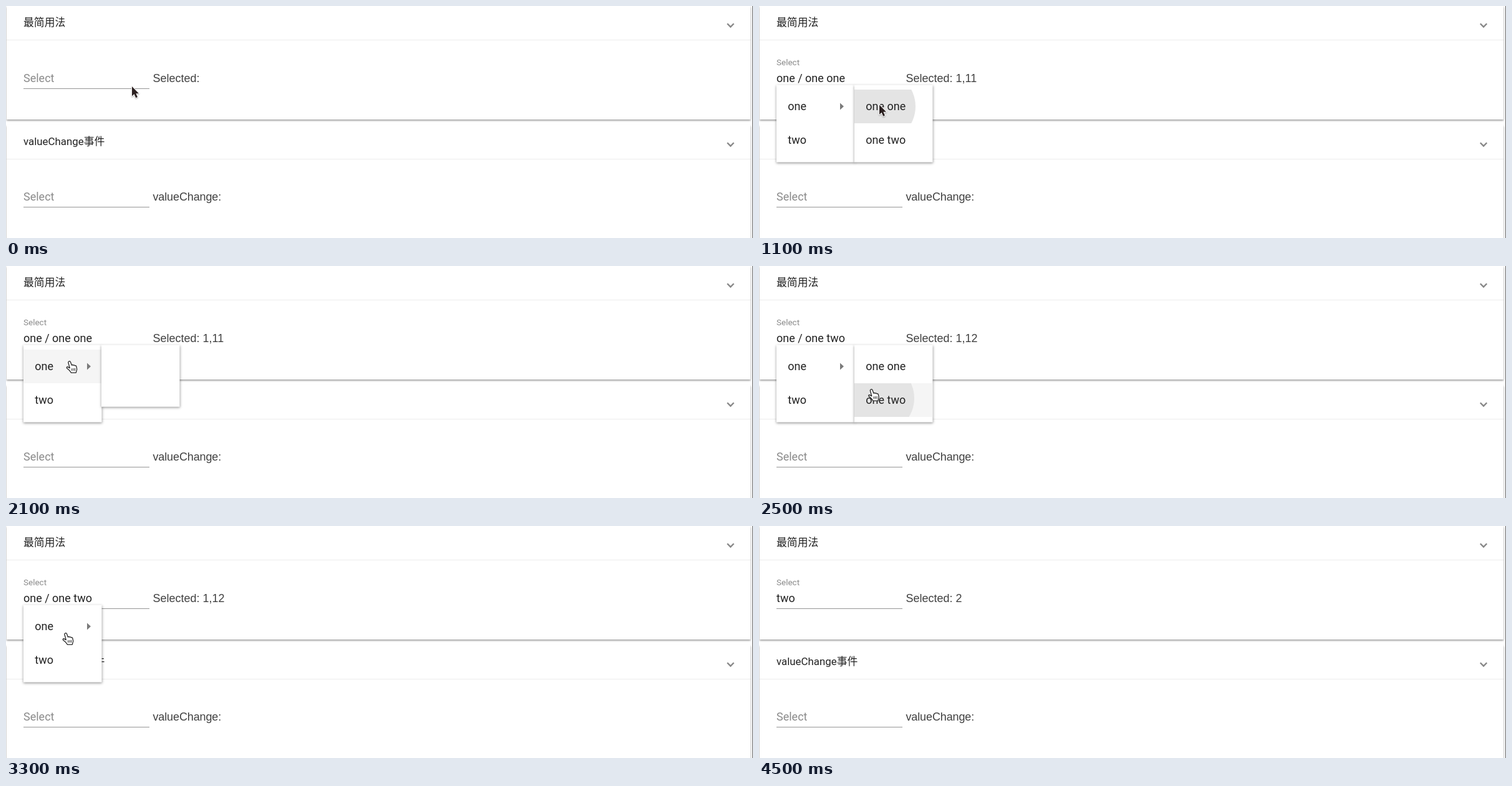
These frames come from a looping animation (1198 by 372 pixels, 4.6 s). An HTML page with a canvas:

```html
<!DOCTYPE html>
<html lang="zh">
<head>
<meta charset="utf-8">
<title>Cascading select</title>
<style>
  html, body { margin: 0; width: 100%; height: 100%; overflow: hidden; background: #fff; }
  canvas { display: block; width: 1198px; height: 372px; }
</style>
</head>
<body>
<canvas id="stage" width="1198" height="372"></canvas>
<script>
const ctx = document.getElementById('stage').getContext('2d');
const LOOP = 4600, STEP = 100;
const UI = 'Roboto, "Noto Sans CJK SC", "Noto Sans CJK", sans-serif';
const BODY = '"Liberation Sans", Arial, sans-serif';

const rootOpen = [[300, 1300], [1700, 2600], [2900, 3600]];
const subOpen = [[700, 1300], [2000, 2600]];
const picks = [
  { at: 1100, value: 'one / one one', result: '1,11' },
  { at: 2500, value: 'one / one two', result: '1,12' },
  { at: 3600, value: 'two', result: '2' }
];
// click time, menu x, row, pointer x, pointer y
const ripples = [[1000, 153, 0, 194, 161], [2400, 153, 1, 192, 212], [3500, 28, 1, 88, 212]];
const hovers = [[500, 800, 28, 0], [1900, 2300, 28, 0], [2300, 2600, 153, 1], [3400, 3600, 28, 1]];
// time, x, y, pointer shape from that time on
const path = [
  [0, 202, 129, 'arrow'], [300, 198, 127, 'arrow'], [600, 128, 157, 'hand'],
  [800, 165, 159, 'hand'], [1000, 194, 159, 'arrow'], [1400, 190, 157, 'arrow'],
  [1700, 150, 122, 'hand'], [1900, 108, 150, 'hand'], [2100, 101, 152, 'hand'],
  [2200, 115, 156, 'hand'], [2400, 189, 206, 'hand'], [2600, 170, 188, 'arrow'],
  [2800, 131, 140, 'arrow'], [2900, 118, 122, 'hand'], [3100, 104, 140, 'hand'],
  [3300, 95, 171, 'hand'], [3500, 87, 206, 'hand'], [3900, 85, 207, 'hand'],
  [4000, 84, 212, 'hand'], [4200, 78, 290, 'arrow'], [4400, 70, 380, 'arrow']
];

const clamp = v => Math.max(0, Math.min(1, v));
const lerp = (a, b, k) => a + (b - a) * k;
const within = (t, from, to) => t >= from && t < to;

function rect(x, y, w, h, color) {
  ctx.fillStyle = color;
  ctx.fillRect(x, y, w, h);
}

function text(str, x, y, size, color, family = UI, spacing = '0px') {
  ctx.font = `${size}px ${family}`;
  ctx.letterSpacing = spacing;
  ctx.fillStyle = color;
  ctx.fillText(str, x, y);
}

function panel(x, y, w, h, blur, drop, alpha) {
  ctx.save();
  ctx.shadowColor = `rgba(0,0,0,${alpha})`;
  ctx.shadowBlur = blur;
  ctx.shadowOffsetY = drop;
  rect(x, y, w, h, '#fff');
  ctx.restore();
}

function chevron(y) {
  ctx.strokeStyle = '#858585';
  ctx.lineWidth = 2.3;
  ctx.beginPath();
  ctx.moveTo(1156.8, y - 2.8);
  ctx.lineTo(1162, y + 2.5);
  ctx.lineTo(1167.2, y - 2.8);
  ctx.stroke();
}

function card(y, h, title, hovered) {
  panel(1, y, 1193, h, 3, 1.5, .45);
  if (hovered) rect(1, y, 1193, 55, '#f6f6f6');
  rect(1, y + 55, 1193, 1, '#ececec');
  text(title, 28, y + 33, 16.88, '#222');
  chevron(y + 32);
}

function field(y, label, value, float, caption, spacing) {
  const size = lerp(18, 13.5, float);
  text(label, 28, y + lerp(0, -27.5, float), size, '#8b8b8b');
  text(value, 28, y, 18, '#222');
  rect(28, y + 10, 202, 1, '#969696');
  text(caption, 235.5, y, 18, '#404040', BODY, spacing);
}

function menu(t, spans, x, items, nested) {
  const span = spans.find(([from, to]) => within(t, from, to + 200));
  if (!span) return;
  const age = t - span[0];
  const scale = Math.min(1, .6 + age / 500);
  const height = 124 * scale;
  const alpha = 1 - clamp((t - span[1]) / 200);
  if (!alpha) return;
  ctx.save();
  ctx.globalAlpha = alpha;
  panel(x, 126.5, 125.5, height, 4, 1.5, .42);
  ctx.beginPath();
  ctx.rect(x, 126.5, 125.5, height);
  ctx.clip();
  for (const [from, to, hx, row] of hovers)
    if (hx === x && within(t, from, to)) rect(x, 134 + row * 54, 125.5, 54, '#f5f5f5');
  for (const ripple of ripples) if (ripple[1] === x) drawRipple(t, ripple, alpha);
  ctx.globalAlpha = alpha * clamp((age - 100) / 200);
  items.forEach((item, i) => text(item, x + 18.3, 167.3 + i * 54, 18, '#222'));
  if (nested) {
    ctx.fillStyle = '#7b7b7b';
    ctx.beginPath();
    ctx.moveTo(x + 102, 155.5);
    ctx.lineTo(x + 108, 161);
    ctx.lineTo(x + 102, 166.5);
    ctx.fill();
  }
  ctx.restore();
}

function drawRipple(t, [at, x, row, cx, cy], alpha) {
  const age = t - at;
  if (!within(age, 0, 400)) return;
  ctx.save();
  ctx.globalAlpha = alpha * (1 - clamp((age - 100) / 300));
  ctx.beginPath();
  ctx.rect(x, 134 + row * 54, 125.5, 54);
  ctx.clip();
  ctx.beginPath();
  ctx.arc(cx, cy, 57 * age / 100, 0, Math.PI * 2);
  ctx.fillStyle = '#e4e4e4';
  ctx.fill();
  ctx.restore();
}

const arrow = new Path2D('M0 0V15.5L3.6 12.2L6.2 18.2L9 17L6.4 11.2H11Z');
const hand = new Path2D('M4 1.2Q5.8-.2 7 2L8.8 7Q10.2 5.8 11.4 7.2Q12.8 6.2 14 7.8Q15.8 7.2 16.4 9.2L17.2 13.6L15.8 19.2H8L5.4 15.6L1 11.8Q.2 9.8 2.2 9.6L5.8 11.6L3.4 3Q3.2 1.8 4 1.2Z');
const fingers = new Path2D('M9.2 12.2V16M11.6 12V16M14 11.8V16');

function pointer(t) {
  let i = path.length - 1;
  while (path[i][0] > t) i--;
  const a = path[i], b = path[i + 1];
  if (!b) return;
  const k = (t - a[0]) / (b[0] - a[0]);
  const x = lerp(a[1], b[1], k), y = lerp(a[2], b[2], k);
  ctx.save();
  ctx.lineJoin = 'round';
  if (a[3] === 'arrow') {
    ctx.translate(x, y);
    ctx.shadowColor = 'rgba(0,0,0,.3)';
    ctx.shadowBlur = 2;
    ctx.shadowOffsetY = 1;
    ctx.strokeStyle = '#fff';
    ctx.lineWidth = 2;
    ctx.stroke(arrow);
    ctx.shadowColor = 'transparent';
    ctx.fillStyle = '#2b2020';
    ctx.fill(arrow);
  } else {
    ctx.translate(x - 4.5, y);
    ctx.fillStyle = '#fff';
    ctx.strokeStyle = '#252525';
    ctx.lineWidth = 1.3;
    ctx.fill(hand);
    ctx.stroke(hand);
    ctx.lineWidth = 1;
    ctx.stroke(fingers);
  }
  ctx.restore();
}

function draw(t) {
  rect(0, 0, 1198, 372, '#fff');
  card(-1, 183, '最简用法', false);
  card(190, 200, 'valueChange事件', within(t, 3700, 4100));
  rect(1197, 0, 1, 372, '#636363');

  const pick = picks.filter(p => t >= p.at).pop() || { value: '', result: '' };
  field(122, 'Select', pick.value, clamp((t - 300) / 300), 'Selected: ' + pick.result);
  field(312, 'Select', '', 0, 'valueChange:', '-0.13px');

  menu(t, rootOpen, 28, ['one', 'two'], true);
  menu(t, subOpen, 153.5 - .5, ['one one', 'one two'], false);
  pointer(t);
}

function tick(now) {
  draw(Math.floor(now % LOOP / STEP) * STEP);
  requestAnimationFrame(tick);
}
requestAnimationFrame(tick);
</script>
</body>
</html>
```
